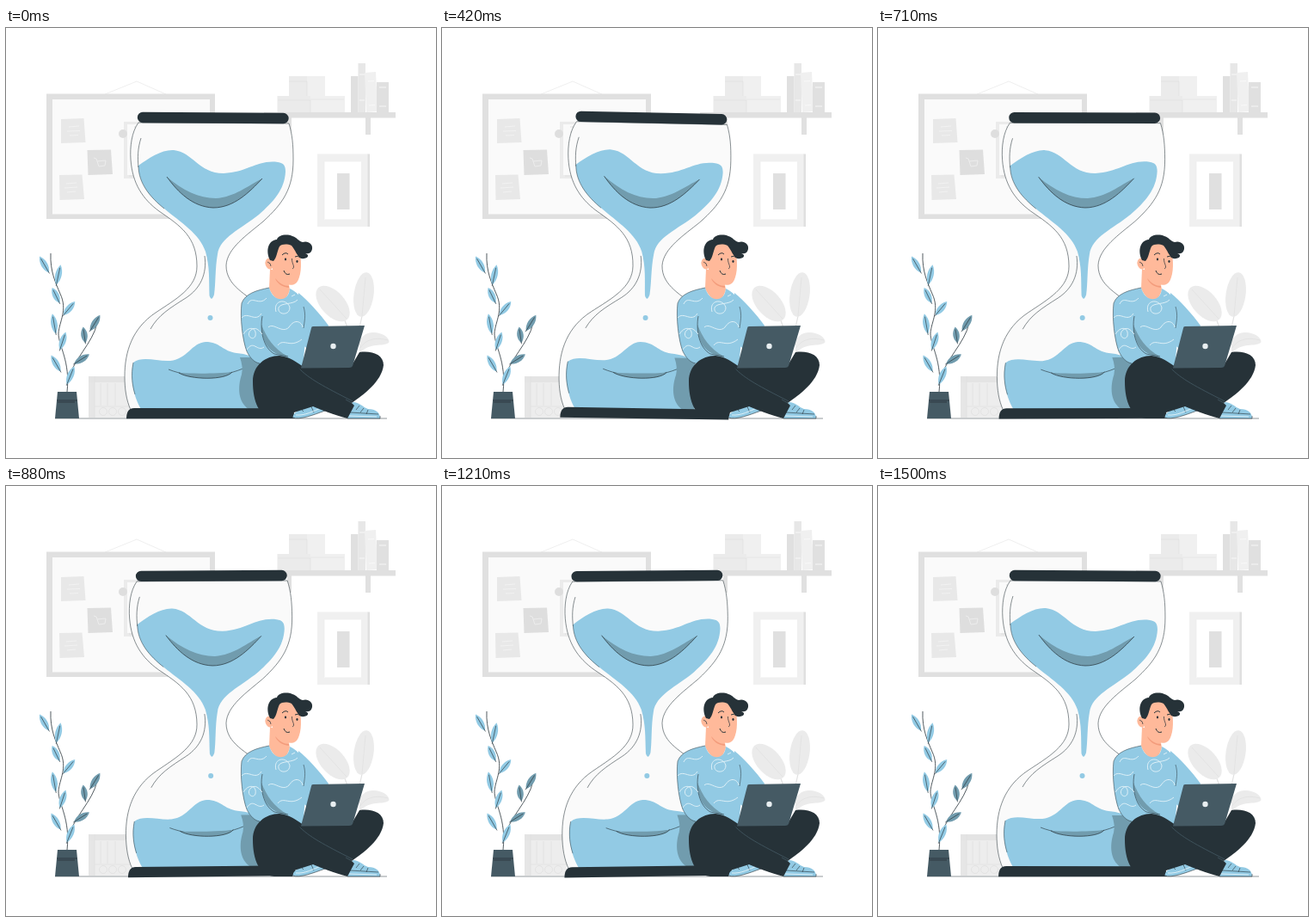
These frames come from a looping animation (500x500 px, 1540 ms). An HTML page with a canvas:

```html
<!DOCTYPE html>
<html lang="en">
<head>
<meta charset="utf-8">
<title>Hourglass</title>
<style>
html, body { margin: 0; width: 100%; height: 100%; overflow: hidden; background: #fff; }
canvas { display: block; width: 500px; height: 500px; }
</style>
</head>
<body>
<canvas id="stage" width="500" height="500"></canvas>
<script>
const ctx = document.getElementById('stage').getContext('2d');
const LOOP = 1540, STEPS = 37;
const PIVOT = { x: 237, y: 276 };
const BLUE = '#92cae4', SHADE = '#719cae', DARK = '#263238', SLATE = '#455a64';
const SKIN = '#ffb99a', PALE = '#fafafa', G2 = '#ebebeb', G3 = '#e0e0e0';
const GLASS = 'M154 110C146 121 144 138 145 153C147 181 159 199 178 213C203 230 222 243 222 277C222 302 198 315 174 331C147 349 138 376 138 405C138 420 140 433 145 444L300 444L300 327C279 309 256 300 256 276C257 256 281 240 299 225C322 204 334 187 334 153C334 136 333 124 329 111Z';

function fill(color, d) {
  ctx.fillStyle = color;
  ctx.fill(new Path2D(d));
}

function line(color, width, d) {
  ctx.strokeStyle = color;
  ctx.lineWidth = width;
  ctx.stroke(new Path2D(d));
}

function rect(color, x, y, right, bottom) {
  ctx.fillStyle = color;
  ctx.fillRect(x, y, right - x, bottom - y);
}

function oval(color, x, y, rx, ry = rx, degrees = 0) {
  ctx.fillStyle = color;
  ctx.beginPath();
  ctx.ellipse(x, y, rx, ry, degrees * Math.PI / 180, 0, 7);
  ctx.fill();
}

function leaf(color, x, y, length, degrees, width = 8) {
  ctx.save();
  ctx.translate(x, y);
  ctx.rotate(degrees * Math.PI / 180);
  const h = length / 2;
  fill(color, `M0 ${-h}C${width * .65} ${-h * .4} ${width * .6} ${h * .4} 0 ${h}C${-width * .65} ${h * .4} ${-width * .6} ${-h * .4} 0 ${-h}Z`);
  line(DARK, .6, `M0 ${-h * .7}L0 ${h * 1.1}`);
  ctx.restore();
}

function drawBoard() {
  line(G2, .8, 'M115 77L152 62L186 77');
  rect(G3, 47, 76.5, 243, 222);
  rect(PALE, 54, 83, 237, 216.5);
  fill('#e8e8e8', 'M64 106L90.500 105L92.500 133L64 134Z');
  fill('#dedede', 'M94.500 142L122 141.500L124 170L95.500 171Z');
  fill('#e8e8e8', 'M62 171L88.500 170.500L91 199L62.500 200Z');
  line('#f4f4f4', .8, 'M73 115L85 114M71 120L86 119.500M74 125L84 124.500M70 181L82 180M68 186L83 185M71 191L81 190');
  line('#f0f0f0', .8, 'M102 151L105 152L108 161L115 160L116 154L106 155');
  rect(G2, 137, 109, 175, 175);
  rect(PALE, 141, 112, 172, 171);
  oval('#dedede', 136, 123, 5);
  line(G3, 1, 'M149 115H160M149 121H160M143 172H160');
}

function drawShelf() {
  rect(G2, 329, 56, 350, 79);
  rect('#f0f0f0', 350, 56, 371, 79);
  line(G3, .7, 'M329 62H350V79');
  rect(G2, 315.5, 79, 354, 98);
  rect('#f0f0f0', 354, 79, 394, 98);
  line(G3, .7, 'M316 84H354V98M354 83H393');
  rect(G3, 401, 56, 409.5, 98);
  rect('#e7e7e7', 409.5, 41, 418, 98);
  fill('#f0f0f0', 'M417 52L430 51L432 97L419 98Z');
  rect(G3, 431, 63, 445, 98);
  line(PALE, .8, 'M411 54H417M411 84H417M434 69H442M434 91H442M421 62L428 61.500M422 90L429 89.500');
  rect(G3, 300, 98, 453, 104.5);
  rect(G3, 418, 104, 424, 124);
  rect(G3, 327, 104, 332, 124);
}

function drawFrame() {
  rect('#f0f0f0', 362, 146.5, 421, 231);
  rect(G3, 420.5, 146.5, 423, 231);
  rect('#fff', 370, 155, 413, 222.5);
  line(G2, .7, 'M370 222V155H413');
  rect(G3, 385, 169, 399.5, 211);
}

function drawFloorItems() {
  rect('#e4e4e4', 96, 405, 145, 412);
  rect('#ededed', 102, 412, 145, 453);
  rect('#e6e6e6', 96, 412, 103, 453);
  line(G3, .8, 'M103 405V453M110 413V439M118 413V439M127 413V439M103 440H145');
  for (const x of [113, 124, 135]) {
    ctx.beginPath();
    ctx.arc(x, 446, 4.5, 0, 7);
    ctx.stroke();
  }
  line(G3, 1.2, 'M414 335C411 350 407 365 400 378M392 335C398 350 402 362 400 375M421 363C410 366 404 372 400 380');
  oval(G2, 416, 310, 11.5, 26, 8);
  oval(G2, 380, 320.5, 14, 25, -42);
  fill(G2, 'M411 372C409 356 424 352 434 355C443 357 447 364 445 366C438 371 424 365 411 378Z');
  line(G3, .7, 'M418 290L414 335M365 304L396 338M444 363C430 359 418 362 412 372');
  line(DARK, .5, 'M57 454H443');
}

function drawPlant() {
  line(DARK, .8, 'M52 262C51 283 58 297 63 309C72 328 62 341 61 355C61 370 75 387 71 423M72 411C77 386 101 367 106 343');
  const leaves = [
    [44.5, 275, 22, -30], [61, 287, 24, 12], [58, 311, 20, -26], [73.5, 326, 21, 40],
    [56, 344, 24, -10], [66, 364, 22, 18], [58, 390, 22, -30], [75, 404, 23, 22]
  ];
  for (const [x, y, length, angle] of leaves) leaf(BLUE, x, y, length, angle);
  leaf(SHADE, 91, 357, 19, -8);
  leaf(SHADE, 103.5, 343, 22, 32);
  leaf(SHADE, 88, 385, 21, 58);
  fill(SLATE, 'M60 423H82L85 454H57Z');
  line(DARK, .8, 'M59 433H83M60 435H80');
}

function drawHourglass(degrees) {
  ctx.save();
  ctx.translate(PIVOT.x, PIVOT.y);
  ctx.rotate(degrees * Math.PI / 180);
  ctx.translate(-PIVOT.x, -PIVOT.y);

  fill(PALE, GLASS);
  line(DARK, .55, GLASS);
  line(DARK, .55, 'M157 128C153 140 153 151 154 162M231 265C234 286 226 303 209 314C190 326 177 334 168 350');
  fill(BLUE, 'M154 160C166 151 182 141 195 142C217 144 224 169 253 169C281 168 292 153 316 156C323 157 325 160 325 167C324 188 311 202 294 217C273 234 249 243 246 263C243 280 244 296 242 310Q239 319 236.500 311C236 292 237 278 232 260C225 239 203 226 184 210C168 197 154 181 154 160Z');
  line(DARK, .5, 'M154 160C154 181 168 197 184 210');
  fill(SHADE, 'M187 173C206 189 224 198 244 198C265 197 282 183 298 175C283 191 265 209 241 209C217 208 200 191 187 173Z');
  line(DARK, .7, 'M187 173C200 191 217 208 241 209C265 209 283 191 298 175');
  oval(BLUE, 237.5, 337, 3);

  fill(BLUE, 'M148 389C159 381 176 388 191 387C211 385 216 366 232 365C249 365 252 376 268 378C279 379 288 382 296 386V443H157C150 432 143 408 148 389Z');
  line(DARK, .5, 'M148 389C145 404 147 416 150 426');
  line(DARK, .6, 'M189 397C217 408 253 407 280 394');
  fill(SHADE, 'M201 401C218 402 247 402 263 400C255 410 214 409 201 401Z');
  line(DARK, .7, 'M201 401C214 409 255 410 263 400');
  fill(SHADE, 'M272 383H296V443H282C270 435 269 418 274 403Q276 394 272 383Z');

  fill(DARK, 'M140 454.300Q140 442 149 442L329 442.300Q335 444 336 454Z');
  ctx.lineCap = 'round';
  line(DARK, 12.4, 'M159 104L322.500 105');
  ctx.restore();
}

function drawHead() {
  fill(SKIN, 'M307 280L306 303C310 312 316 317 321 317C326 315 329 309 330 304L327 288Z');
  fill('#f39c7c', 'M313 291C318 297 323 300 329 300L329 302C321 301 315 297 313 291Z');
  fill(SKIN, 'M309 260C313 244 338 247 342 262C344 277 343 289 338 296C330 304 314 294 310 281Z');
  oval(SKIN, 306.5, 274, 5, 6.5, -12);
  fill(DARK, 'M307 270C302 260 304 247 315 246C316 241 326 239 333 242C339 244 340 248 345 249C351 247 357 251 356 257C355 262 351 263 348 262C355 265 349 269 343 268C338 265 337 259 332 253C327 251 321 251 318 254C315 260 315 267 311 271Z');
  line(DARK, 1, 'M321 264Q325 260 328 263M336 266Q340 264 342 267');
  oval(DARK, 325, 269, 1.1, 1.4);
  oval(DARK, 338.5, 271.5, 1.1, 1.4);
  line(DARK, .7, 'M332.500 268C332 274 337 278 333 280M304 272Q308 273 308 277');
  line(DARK, 1, 'M323 282Q325 288 330 286');
}

function drawBody() {
  fill(BLUE, 'M340 308C350 316 365 332 375 346L360 380L340 365Z');
  fill(BLUE, 'M306 302C291 305 278 309 274 320C272 337 275 363 280 376C285 387 292 391 300 390L345 395L350 342C350 324 346 311 330 303C329 319 311 320 306 302Z');
  line(DARK, .5, 'M306 302C291 305 278 309 274 320C272 337 275 363 280 376C284 384 289 389 295 390M346 324C349 334 347 341 346 349');
  fill(SHADE, 'M297 345C303 360 311 373 328 382C312 380 298 373 297 345Z');
  line(DARK, .6, 'M298 335C295 351 299 372 312 379L328 382');

  const thread = '#e5f3f9';
  line(thread, .9, 'M281 321C286 310 294 324 303 314M314 330C310 316 327 314 330 325C330 335 315 334 317 325C320 319 334 322 339 316');
  line(thread, .9, 'M274 337C281 329 290 343 297 332M276 356C283 345 292 349 290 358C287 365 278 357 285 351C291 346 296 354 298 356');
  line(thread, .9, 'M305 348C311 342 321 356 329 348C336 337 344 342 345 348M280 374C288 362 292 377 300 371M316 369C323 360 330 373 344 362M332 312L336 310');
}

function drawLegs() {
  fill(BLUE, 'M366 436C354 435 349 434 344 438C342 446 333 447 333 453C342 456 357 450 371 445Z');
  fill(BLUE, 'M403 435C411 435 415 441 421 443C430 443 435 447 435 454H397Z');
  line(DARK, .6, 'M333 453C342 456 357 450 371 445M397 454H435V451');
  line(DARK, .6, 'M344 438L349 442M342 442L346 446M353 436L358 447M411 439L407 444M416 442L412 447M421 444L419 449M400 447L433 449');
  line('#e5f3f9', .9, 'M337 450C348 451 358 445 366 442M399 451L431 452');
  fill(DARK, 'M287 411C287 392 302 381 318 381C330 382 338 389 346 394H401L411 377C426 375 439 380 439 392C437 411 415 427 402 436L405 439L397 454C380 449 368 445 357 440L335 447L333 454H312C294 453 287 434 287 411Z');
  line(SLATE, .8, 'M340 395C352 408 370 417 403 434M402 436L395 432');
}

function drawLaptop() {
  fill(DARK, 'M338 394H404L401 397H342Z');
  fill(SLATE, 'M357 347L417 346L403 393Q402 395 399 395L343 395.500L355 349Q355 347 357 347Z');
  oval('#e8eef0', 380.5, 370, 3.2);
}

// Cubic-bezier(0, 0, .58, 1), solved by bisection.
function easeOut(p) {
  let low = 0, high = 1;
  for (let i = 0; i < 24; i++) {
    const s = (low + high) / 2;
    if (1.74 * s * s * (1 - s) + s ** 3 < p) low = s;
    else high = s;
  }
  return low * low * (3 - 2 * low);
}

function tiltAt(phase) {
  if (phase < .25) return easeOut(phase * 4);
  if (phase < .75) return 1 - 2 * easeOut((phase - .25) * 2);
  return easeOut((phase - .75) * 4) - 1;
}

// Steps begin on whole hundredths of a second.
function stepAt(time) {
  const startOf = step => Math.round(step * LOOP / STEPS / 10) * 10;
  let step = Math.floor(time * STEPS / LOOP) + 1;
  while (startOf(step) > time) step--;
  return step % STEPS;
}

function render(now) {
  const step = stepAt(now % LOOP);
  ctx.fillStyle = '#fff';
  ctx.fillRect(0, 0, 500, 500);
  ctx.lineJoin = 'round';
  drawBoard();
  drawShelf();
  drawFrame();
  drawFloorItems();
  drawPlant();
  drawHourglass(tiltAt(step / STEPS));
  drawHead();
  drawBody();
  drawLegs();
  drawLaptop();
}

let origin;
function tick(now) {
  origin ??= now;
  render(now - origin);
  requestAnimationFrame(tick);
}
render(0);
requestAnimationFrame(tick);
</script>
</body>
</html>
```
